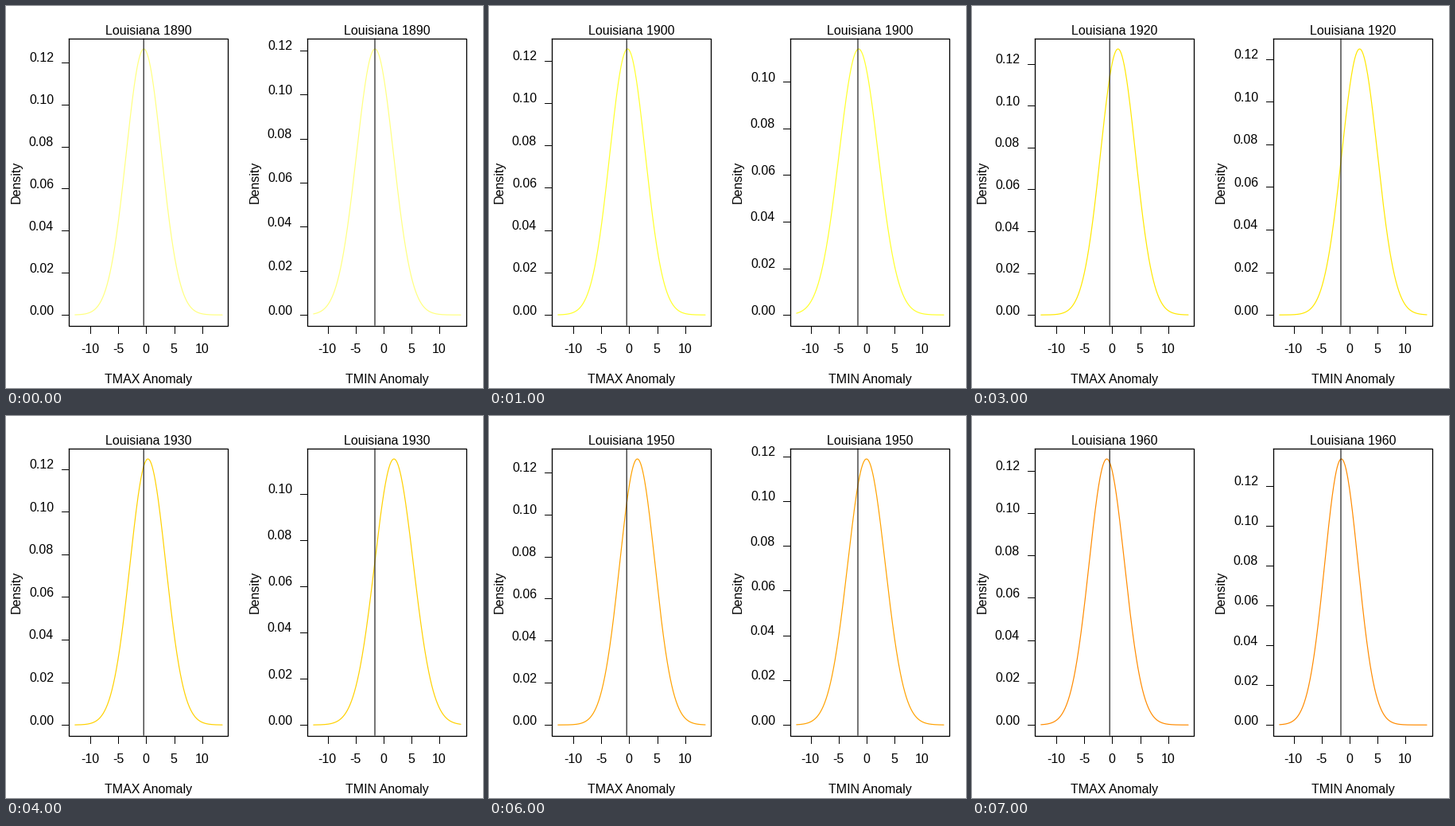
These frames come from a looping animation (600x480 px, 8000 ms). A matplotlib script:

```python
import numpy as np
import matplotlib.pyplot as plt
from matplotlib.animation import FuncAnimation

W, H, DPI = 600, 480, 96
PX = 72 / DPI  # one pixel in points
LEFT, RIGHT, TOP, BOTTOM = 79.4, 279.4, 40.6, 401.6
BASE, PEAK = 388.2, 54.0
UNIT = 7.02  # pixels per degree

# (mean, peak density) of the normal curve per decade
TMAX = [(-0.43, .1263), (-0.30, .1255), (-0.19, .1247), (1.03, .1271),
        (0.30, .1247), (0.90, .1255), (1.45, .1263), (-0.97, .1255)]
TMIN = [(-1.52, .1206), (-1.40, .1140), (-1.25, .1083), (1.82, .1247),
        (1.88, .1150), (0.95, .1170), (0.00, .1188), (-1.45, .1335)]

plt.rcParams["font.family"] = "Liberation Sans"
plt.rcParams["font.size"] = 16 * PX

fig = plt.figure(figsize=(W / DPI, H / DPI), dpi=DPI, facecolor="white")
ax = fig.add_axes([0, 0, 1, 1])
ax.set_xlim(0, W)
ax.set_ylim(H, 0)
ax.axis("off")


def line(xs, ys, width=1.0, **style):
    style.setdefault("color", "black")
    return ax.plot(xs, ys, lw=width * PX, **style)[0]


def label(x, y, text, ha="center", **style):
    return ax.text(x, y, text, ha=ha, va="baseline", **style)


def decade_color(k):
    """Heat palette: pale yellow, full yellow, then towards red."""
    if k < 2:
        return (1, 1, (0.5, 1 / 6)[k])
    return (1, 1 - (k - 2) / 11, 0)


class Panel:
    def __init__(self, x0, zero, name, mark, data):
        self.x0, self.zero, self.data = x0, zero, data
        mid = x0 + (LEFT + RIGHT) / 2
        self.title = label(mid, 36, "")
        label(mid, 474, name)
        label(x0 + 17.4, 221, "Density", rotation=90, rotation_mode="anchor")

        self.xs = np.linspace(x0 + LEFT + 7.4, x0 + RIGHT - 7.4, 300)
        self.curve = line([], [], 1.2, solid_capstyle="round", zorder=2)
        line([mark, mark], [TOP, BOTTOM], 1.2, color="#1c1c1c",
             snap=False, solid_capstyle="butt", zorder=3)
        left, right = x0 + LEFT, x0 + RIGHT
        line([left, right, right, left, left],
             [TOP, TOP, BOTTOM, BOTTOM, TOP], 1.3,
             solid_joinstyle="miter", zorder=4)

        for value in range(-10, 11, 5):
            x = zero + value * UNIT
            line([x, x], [BOTTOM, BOTTOM + 9.6])
            label(x - 0.3, 436, str(value))
        self.ticks = [(line([left - 9.8, left], [0, 0]),
                       label(x0 + 60, 0, f"{i * .02:.2f}", ha="right"))
                      for i in range(7)]

    def show(self, k):
        mean, peak = self.data[k]
        self.title.set_text(f"Louisiana {1890 + 10 * k}")

        sigma = 1 / (peak * np.sqrt(2 * np.pi))
        z = ((self.xs - self.zero) / UNIT - mean) / sigma
        self.curve.set_data(self.xs, BASE - (BASE - PEAK) * np.exp(-z * z / 2))
        self.curve.set_color(decade_color(k))

        for i, (tick, text) in enumerate(self.ticks):
            y = BASE - (BASE - PEAK) * i * .02 / peak
            tick.set_ydata([y, y])
            text.set_y(y - 0.5)
            tick.set_visible(y > TOP)
            text.set_visible(y > TOP)


panels = [Panel(0, 176.4, "TMAX Anomaly", 173.2, TMAX),
          Panel(300, 474.8, "TMIN Anomaly", 464.0, TMIN)]


def draw(k):
    for panel in panels:
        panel.show(k)
    return []


anim = FuncAnimation(fig, draw, frames=len(TMAX), interval=1000,
                     repeat=True, repeat_delay=0, blit=False)
plt.show()
```
